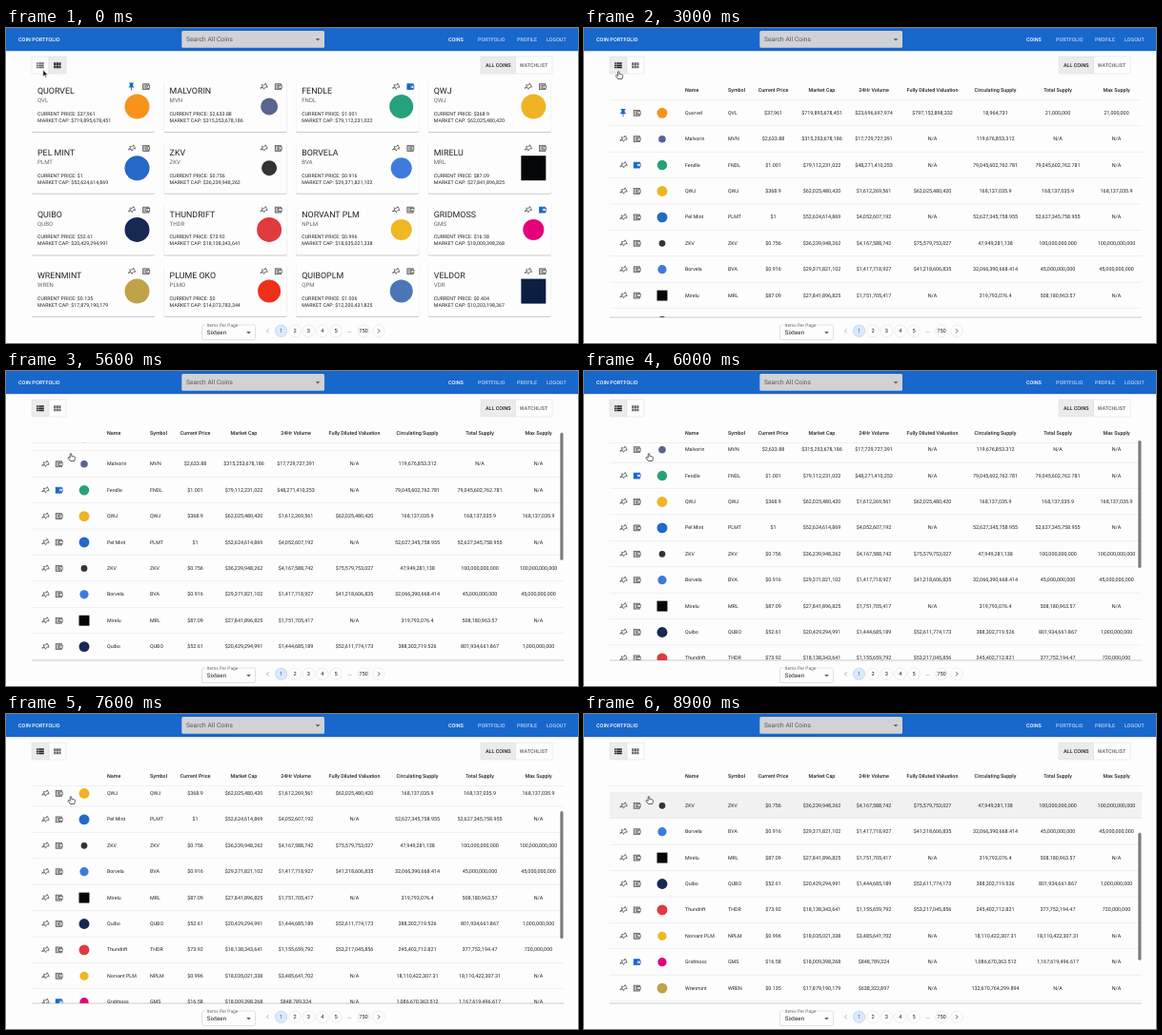
An HTML page for the animation above (9 s loop, 600 px wide and 331 px high).

```html
<!DOCTYPE html>
<html lang="en">
<head>
<meta charset="utf-8">
<title>Coin portfolio</title>
<style>
html, body { margin: 0; width: 100%; height: 100%; overflow: hidden; background: #fefdfe; }
svg { display: block; width: 600px; height: 331px; font-family: Roboto, sans-serif; text-rendering: geometricPrecision; }
.card { fill: #fefdfe; filter: drop-shadow(0 1px .4px rgba(0,0,0,.2)); }
.bar { fill: #1867cb; filter: drop-shadow(0 .8px .8px rgba(0,0,0,.3)); }
</style>
</head>
<body>
<svg id="stage" viewBox="0 0 600 331"></svg>
<script>
// name | symbol | price | market cap | volume | diluted | circulating | total | max
const coins = `Quorvel|QVL|37,961|719,895,678,451|23,696,697,974|797,153,898,332|18,964,731|21,000,000|21,000,000
Malvorin|MVN|2,633.88|315,253,678,186|17,729,727,391|-|119,676,853.312|-|-
Fendle|FNDL|1.001|79,112,231,022|48,271,410,253|-|79,045,602,762.781|=|-
QWJ|QWJ|368.9|62,025,480,420|1,612,269,561|62,025,480,420|168,137,035.9|=|=
Pel Mint|PLMT|1|52,624,614,869|4,052,607,192|-|52,627,345,758.955|=|-
ZKV|ZKV|0.756|36,239,948,262|4,167,588,742|75,579,753,027|47,949,281,138|100,000,000,000|=
Borvela|BVA|0.916|29,371,821,102|1,417,718,927|41,218,606,835|32,066,390,668.414|45,000,000,000|=
Mirelu|MRL|87.09|27,841,896,825|1,751,705,417|-|319,793,076.4|508,180,963.57|-
Quibo|QUBO|52.61|20,429,294,991|1,444,685,189|52,611,774,173|388,302,719.526|801,934,661.867|1,000,000,000
Thundrift|THDR|73.92|18,138,343,641|1,155,659,792|53,217,045,856|245,402,712.821|377,752,194.47|720,000,000
Norvant PLM|NPLM|0.996|18,035,021,338|3,485,641,702|-|18,110,422,307.31|=|-
Gridmoss|GMS|16.58|18,009,398,268|848,789,324|-|1,086,670,363.512|1,167,619,496.617|-
Wrenmint|WREN|0.135|17,879,190,179|638,322,897|-|132,670,764,299.894|-|-
Plume Oko|PLMO|0|14,073,783,344
QuiboPLM|QPM|1.006|12,200,431,825
Veldor|VDR|0.404|10,203,198,367`.split('\n').map(line => line.split('|'));

// colour and large radius of each badge
const badges = `#f7931a 13,#59648f 9,#26a17b 12.5,#f0b323 13,#2468c8 13,#333 8,#3f7bdc 11,#050608 13,
#172852 13,#e03a3e 13,#efb820 11,#e6007a 11,#bfa24a 13,#f0301a 12,#4a76b8 12,#0b1f41 13`
  .split(',').map(s => s.trim().split(' '));
const isSquare = i => i === 7 || i === 15;

const BLUE = '#1867cb', DARK = '#222', PAPER = '#fefdfe', ROW = 27.4, TOP = 75.6;

const rect = (x, y, w, h, fill, extra = '') =>
  `<rect x="${x}" y="${y}" width="${w}" height="${h}" fill="${fill}" ${extra}/>`;
const text = (x, y, s, size, fill = DARK, extra = '') =>
  `<text x="${x}" y="${y}" font-size="${size}" fill="${fill}" ${extra}>${s}</text>`;
const mid = (x, y, s, size, fill, extra = '') =>
  text(x, y, s, size, fill, 'text-anchor="middle" ' + extra);
const circle = (x, y, r, fill, extra = '') =>
  `<circle cx="${x}" cy="${y}" r="${r}" fill="${fill}" ${extra}/>`;
const path = (d, fill, extra = '') => `<path d="${d}" fill="${fill}" ${extra}/>`;
const group = (x, y, inner, more = '') => `<g transform="translate(${x} ${y}) ${more}">${inner}</g>`;
const medium = 'font-weight="500"';

function pin(x, y, on) {
  const d = 'M4-3V-8H6V-10H-6V-8H-4V-3Q-4 0-7 0V2H-1V9L0 10 1 9V2H7V0Q4 0 4-3Z';
  return on ? group(x, y, path(d, BLUE), 'scale(.42)')
    : group(x, y, path(d, 'none', 'stroke="#444" stroke-width="1.8"'), 'rotate(65) scale(.36)');
}

function wallet(x, y, on) {
  const color = on ? BLUE : '#555', line = `stroke="${color}" stroke-width="2"`;
  return group(x, y,
    rect(-9, -8, 17, 16, on ? color : '#b5b5b5', line) +
    rect(0, -4, 10, 8, '#fff', line) + circle(4, 0, 1.6, color), 'scale(.37)');
}

function badge(i, x, y, scale) {
  const [color, size] = badges[i], r = size * scale;
  return isSquare(i) ? rect(x - r, y - r, 2 * r, 2 * r, color) : circle(x, y, r, color);
}

function card(coin, i) {
  const [name, symbol, price, cap] = coin;
  const detail = 'letter-spacing=".04"';
  return group(27 + i % 4 * 138.6, 55 + Math.floor(i / 4) * 64.7,
    rect(0, 0, 129, 54, PAPER, 'class="card" rx="1.5"') +
    text(6, 14.2, name.toUpperCase(), 8.9) +
    text(6, 23.4, symbol, 6.1, '#666') +
    text(6, 36.9, 'CURRENT PRICE: $' + price, 5.25, DARK, detail) +
    text(6, 44.1, 'MARKET CAP: $' + cap, 5.25, DARK, detail) +
    pin(104.5, 6.7, i === 0) + wallet(120, 6.7, i === 2 || i === 11) +
    badge(i, 110.5, 27.5, 1));
}

const columns = [198.5, 249.5, 304, 365.5, 431.5, 497, 558.5];

function row(coin, i) {
  const [name, symbol, ...cells] = coin;
  let last;
  const values = cells.map((cell, c) => {
    if (cell === '-') return 'N/A';
    if (cell !== '=') last = (c < 4 ? '$' : '') + cell;
    return last;
  });
  return group(0, TOP + i * ROW,
    rect(27, 0, 558, ROW, 'transparent', 'class="row"') +
    rect(27, ROW - .5, 558, .5, '#e2e2e2') +
    pin(41, 13.7, i === 0) + wallet(55.5, 13.7, i === 2 || i === 11) + badge(i, 82, 13.7, .42) +
    text(106, 15.3, name, 5.3) + text(151, 15.3, symbol, 5.3) +
    values.map((v, c) => mid(columns[c], 15.3, v, 5.4)).join(''));
}

const heads = ['Current Price', 'Market Cap', '24Hr Volume', 'Fully Diluted Valuation',
  'Circulating Supply', 'Total Supply', 'Max Supply'];

const table =
  rect(27, 52, 558, 251.5, PAPER, 'class="card"') +
  `<clipPath id="body"><rect x="27" y="${TOP}" width="558" height="${304 - TOP}"/></clipPath>` +
  `<g clip-path="url(#body)"><g id="rows">${coins.slice(0, 13).map(row).join('')}</g></g>` +
  rect(27, TOP - .5, 558, .5, '#e2e2e2') +
  text(106, 66.6, 'Name', 5.4, DARK, medium) + text(151, 66.6, 'Symbol', 5.4, DARK, medium) +
  heads.map((h, c) => mid(columns[c], 66.6, h, 5.4, DARK, medium)).join('') +
  rect(581.3, 54.6, 3.2, 134, '#7d7d7d', 'id="thumb" rx="1.6"');

const arrowDown = (x, y) => path(`M${x - 2.4} ${y - 1.2}h4.8l-2.4 2.4z`, '#666');

const bar = rect(0, 0, 600, 24, BLUE, 'class="bar"') +
  text(13, 14, 'COIN PORTFOLIO', 5.45, '#fff', medium + ' letter-spacing=".06"') +
  rect(184.3, 3, 149.7, 17.7, '#d0d2d5', 'rx="1.5"') +
  text(189, 14.4, 'Search All Coins', 6.6, '#555', 'letter-spacing=".08"') + arrowDown(327, 12.2) +
  [[464, 'COINS'], [495, 'PORTFOLIO'], [536, 'PROFILE'], [567, 'LOGOUT']].map(([x, s], i) =>
    text(x, 14, s, 5.4, i ? '#b5d0f0' : '#fff', medium)).join('');

const border = 'stroke="#dcdcdc" stroke-width=".5"';
const listIcon = [36.2, 38.4, 40.6].map(y => `M32 ${y}h1.7v1.6h-1.7zm2.2 0h5.6v1.6h-5.6z`).join('');
const gridIcon = [36.2, 39.5].map(y =>
  [50.2, 52.8, 55.4].map(x => `M${x} ${y}h2.1v2.7h-2.1z`).join('')).join('');

const toggles =
  rect(27, 30, 18, 18, PAPER, `id="listButton" ${border}`) +
  rect(45, 30, 18, 18, PAPER, `id="gridButton" ${border}`) +
  path(listIcon, DARK, 'id="listIcon"') + path(gridIcon, DARK, 'id="gridIcon"') +
  rect(498, 30, 36.5, 18, '#ebebeb', border) + rect(534.5, 30, 38.5, 18, PAPER, border) +
  mid(516.3, 41, 'ALL COINS', 5.4, DARK, medium) + mid(553.5, 41, 'WATCHLIST', 5.4, '#666', medium);

const chevron = (x, dir, color) =>
  path(`M${x - dir} 316.3L${x + dir} 318.3 ${x - dir} 320.3`, 'none', `stroke="${color}" stroke-width=".8"`);
const pages = ['1', '2', '3', '4', '5', '...', '750'].map((s, i) => {
  const x = 288.6 + i * 14.4;
  const ring = i === 5 ? '' : i === 0
    ? circle(x, 318.3, 6.3, '#dce8f8', 'stroke="#a9c6ec" stroke-width=".5"')
    : circle(x, 318.3, 6.3, PAPER, border);
  return ring + mid(x, 320.3, s, 5.7, i ? DARK : BLUE);
}).join('');

const footer =
  rect(205.5, 312, 56, 15.5, PAPER, 'rx="1.5" stroke="#c4c4c4" stroke-width=".5"') +
  rect(209, 311, 34, 2, PAPER) +
  text(210.5, 314, 'Items Per Page', 4.85, '#666') + text(210.8, 322.4, 'Sixteen', 6.2) +
  arrowDown(254.5, 320.2) + pages +
  circle(391, 318.3, 6.3, PAPER, border) + chevron(274.5, -1, '#999') + chevron(391, 1, '#333');

const outline = 'stroke-width=".7" stroke-linejoin="round"';
const cursor = '<g id="cursor">' +
  path('M0 0V7.2L1.7 5.7 2.9 8.3 4 7.8 2.8 5.3H5.1Z', '#111', `id="arrow" stroke="#fff" ${outline}`) +
  path('M-.8.6Q0-.5.8.6V3L3.6 3.5Q4.7 3.8 4.5 5L3.7 8H-.7L-3 4.7Q-2.7 3.6-1.7 4.2L-.8 5Z',
    '#fff', `id="hand" stroke="#222" ${outline}`) + '</g>';

const $ = id => document.getElementById(id);
$('stage').innerHTML = rect(0, 0, 600, 331, PAPER) +
  `<g id="cards">${coins.map(card).join('')}</g><g id="table">${table}</g>` +
  bar + toggles + footer + cursor;
const rowBacks = [...document.querySelectorAll('.row')];

// Linear interpolation through [time, value] pairs
function along(keys, t) {
  if (t <= keys[0][0]) return keys[0][1];
  for (let i = 1; i < keys.length; i++) {
    const [t0, v0] = keys[i - 1], [t1, v1] = keys[i];
    if (t <= t1) return v0 + (v1 - v0) * (t - t0) / (t1 - t0);
  }
  return keys[keys.length - 1][1];
}

const cursorX = [[0, 38.8], [700, 36.3], [4000, 36.3], [4800, 68]];
const cursorY = [[0, 44], [700, 45.5], [4000, 45.5], [4800, 86.5]];
const scrolling = [[5100, 0], [6000, 34], [6500, 54], [6900, 67], [7000, 67], [7600, 88], [8800, 130]];
const show = (id, on) => $(id).setAttribute('display', on ? 'inline' : 'none');
const fill = (id, color) => $(id).setAttribute('fill', color);

function draw(t) {
  const list = t >= 2700, x = along(cursorX, t), y = along(cursorY, t), scroll = along(scrolling, t);
  const overButton = t > 0 && y < 48, overRows = list && y > TOP;
  const still = t <= 5100 || t >= 8800;

  show('cards', !list);
  show('table', list);
  fill('listButton', list ? '#ebebeb' : overButton ? '#f4f4f4' : PAPER);
  fill('gridButton', list ? PAPER : '#ebebeb');
  fill('listIcon', list ? DARK : '#666');
  fill('gridIcon', list ? '#666' : DARK);

  $('rows').setAttribute('transform', `translate(0 ${-scroll})`);
  $('thumb').setAttribute('y', 54.6 + scroll * .54);
  show('thumb', t > 5100);
  const hovered = overRows && still ? Math.floor((y + 1 + scroll - TOP) / ROW) : -1;
  rowBacks.forEach((r, i) => r.setAttribute('fill', i === hovered ? '#f0f1f0' : 'transparent'));

  $('cursor').setAttribute('transform', `translate(${x} ${y})`);
  show('hand', overButton || overRows);
  show('arrow', !overButton && !overRows);
}

function tick() {
  draw(Math.floor(performance.now() % 9000 / 100) * 100);
  requestAnimationFrame(tick);
}
tick();
</script>
</body>
</html>
```
